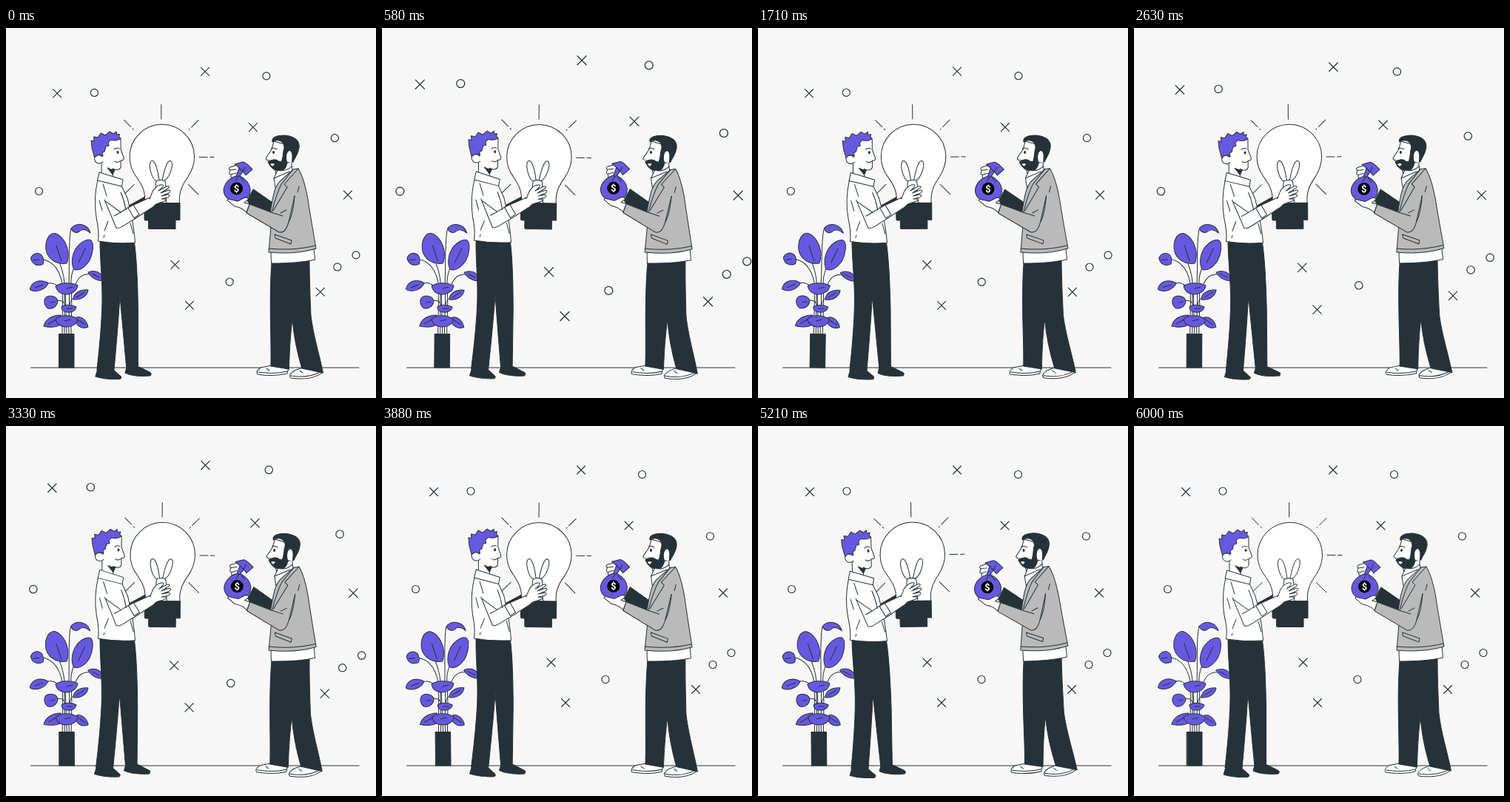
Write an HTML page that moves like this. It is 500 by 500 pixels and loops after 6040 ms.

```html
<!DOCTYPE html>
<html lang="en">
<head>
<meta charset="utf-8">
<title>Idea and funding</title>
<style>
  html, body { margin: 0; width: 100%; height: 100%; overflow: hidden; background: #f7f7f7; }
  svg { display: block; width: 100vw; height: 100vh; }
  svg * { stroke-linecap: round; stroke-linejoin: round; }
  g { fill: none; stroke: #263238; stroke-width: 1; }
  #marks { stroke-width: 1.15; }
  .w { fill: #fff; }
  .d { fill: #263238; }
  .p { fill: #6858e0; }
  .j { fill: #bababa; }
  text { font: 700 13px Roboto, Arial, sans-serif; fill: #fff; stroke: none; text-anchor: middle; }
</style>
</head>
<body>
<svg viewBox="0 0 500 500">
  <g id="marks"></g>
  <g><path d="M33.5 459H477"/></g>

  <g id="plant">
    <path d="M76 413C76 390 77 370 76 352M79 413V358M82 413L80 355M85 413C84 390 87 370 85 352M88 413C88 390 90 375 88 350
      M85 345C86 320 84 285 88 271M79 345C78 330 74 322 66 300M88 345C87 335 92 318 104 302M76 345C72 325 62 312 42 312
      M93 349C97 336 104 331 119 333M70 349C65 344 59 343 50 347M80 376C79 369 74 366 62 370M86 376C86 368 90 364 98 361"/>
    <path class="p" d="M88 271C92 265 100 264 106 267C111 269 113 273 114 277C108 272 103 271 99 275C95 278 90 276 88 271Z"/>
    <path class="p" d="M82 318C70 320 57 314 54 300C52.500 287 58 277 66 277.500C76 280 83 293 84 304C84 311 84 315 82 318Z"/>
    <path class="p" d="M92 326C87.500 319 89 306 95 297C101 289 110 284 115 287C119 291 118 304 113 314C107 323 99 329 92 326Z"/>
    <path class="p" d="M50 319C42 323 35 319 33.500 311C37 303 45 303 49 308C51 312 51 316 50 319Z"/>
    <path class="p" d="M111 330C120 326 130 330 133 341C125 343 115 338 111 330Z"/>
    <path class="p" d="M57 345C50 340 40 341 35 347C33 350 32 353 33 354C41 358 53 354 57 345Z"/>
    <path class="p" d="M91 367C91 358 100 353 111 354C110 362 102 368 91 367Z"/>
    <path class="p" d="M70 369C69 363 60 360 54 364C50 369 52 376 57 379C64 380 69 376 70 369Z"/>
    <path class="p" d="M51 403C53 394 62 388 74 388L75 400C70 405 58 405 51 403Z"/>
    <path class="p" d="M95 391C102 389 109 395 111 404C104 407 98 404 95 399Z"/>
    <path class="p" d="M67 349C74 343 90 344 97 348C96 356 88 360 80 360C72 359 68 354 67 349Z"/>
    <path class="p" d="M75 377C80 373 90 374 95 377C94 382 88 385 83 384C78 384 75 381 75 377Z"/>
    <path class="p" d="M67 394C72 387 90 387 97 394C95 401 88 404 82 404C74 404 69 400 67 394Z"/>
    <path d="M68 294L75 315M107 298L98 317M37 314L45 313M116 332L126 337M39 351L50 347M82 352L90 350M95 364L106 357
      M60 371L66 370M82 379H90M57 400L68 394M79 396L87 394M98 395L107 401"/>
    <path class="d" d="M71.500 413.500H92V459H71.500Z"/>
  </g>

  <g id="seller">
    <path d="M209.700 103.500V123M159.500 124.500L168.500 133.500M171 136L172.500 137.500M260 124.500L250.500 134M248 136.500L247 137.500
      M261 174.500H272M275.500 174.500H281M246.500 211.500L260 225M173 211.500L160 224.500"/>
    <path class="d" d="M161 243L188 228V236L168 249Z"/>
    <path class="w" d="M187.500 237C189 220 183 211 176 201C170 193 167 184 167 174A43.750 43.750 0 0 1 254.500 174C254.500 184 251 193 246 201C239 211 233 221 234.500 237Z"/>
    <path d="M202 236C203 225 201 216 203 207Q209 204 215 207C217 216 215 225 217 236
      M203 207C196 203 192 184 196 180C201 177 205 191 207 206M214 206C221 203 227 184 223 180C218 177 214 191 211 206"/>
    <path class="d" d="M187 236.500H235V259.500H229V271.500H194Q192.500 271.500 192.500 270V260H188.500Q187 260 187 258Z"/>

    <path class="d" d="M163 459L161 466C169 470 182 471 195 470Q198 467 194 465L180 458Z"/>
    <path class="d" d="M124 461L121 471C130 474 142 475 154 474.500Q158 472 153 469L144 461Z"/>
    <path class="d" d="M127 288L173.500 290C177 315 178 350 178.500 380V459L163 460C160 430 157 395 154 362C152 395 149 430 146 463L123 462C126 435 129.500 400 130 370C130.500 340 127 315 127 288Z"/>

    <path class="w" d="M129 176V199L144 202V190C149 193 154 192 155 188L155 179C158 179 160 178 159 175L155 164V150L131 150Z"/>
    <path class="d" d="M137 189Q142 192 147 191.500L144 198Z"/>
    <path class="w" d="M130 174C124 169 118 173 120 179C122 184 128 184 131 181"/>
    <path class="p" d="M119.500 175L116 162L115 152L119 153L118.500 147L124 148L128 142L134 145L140 140L145 143L149 140L149.500 144L153.500 143.500L152.500 147L155 149C151 153 146 152 141 151.500L138 155L139 159L135 160L133 167L130 168.500L131 173C126 170 122 172 119.500 175Z"/>
    <path d="M146 164Q149 161 153 163M147 180Q150 183 154 180"/>
    <ellipse class="d" cx="151" cy="168" rx="1" ry="1.500"/>

    <path class="w" d="M124 205C120 222 119.500 240 122 256C125 270 126 278 124.500 288Q149 292 174.500 290C173 268 169 250 164 230L156 213Z"/>
    <path class="w" d="M126 195L158 205L156.500 214L123.500 206Z"/>
    <path class="w" d="M133 232L149 270C154 272 160 266 174 258L203 239L199 227L166 242L155 249L134 234"/>
    <path class="w" d="M165 243L172 239L180 252L173 257Z"/>
    <path d="M155 249L146 254M155 222C160 233 161 240 162 246M126 233L130 247M131 211L136 227M138 261L133 274M168 264L172 278M133 280L132 283"/>
    <path class="w" d="M194 231L198 221C201 215 207 211 212 212Q214 214 206 220L217 214Q222 213 220 216L209 223L220 219Q224 220 220 223L210 227L219 225Q223 226 219 229L210 231L215 231Q218 233 214 234C208 237 204 236 200 240"/>
  </g>

  <g id="buyer">
    <path class="w" d="M344 459C340 462 338 465 340 468C353 470 368 470 380 467L382 459L359 456Z"/>
    <path class="w" d="M390 463C385 466 382 470 385 473C399 475 416 474 427 466L424 458L403 458Z"/>
    <path d="M341 465C354 467 368 467 380 464M385 470C398 472 414 471 426 464M352 460L356 463M397 463L401 466"/>
    <path class="d" d="M359 317L410 314C410 340 411 362 412 388C415 415 423 438 428.500 466L400 460C394 440 389 419 387 393C384 417 383 440 382.500 461L358 457C359 420 355 370 359 317Z"/>
    <path class="w" d="M358 302L358.500 318C378 318 400 317 417.500 313L416 298Z"/>

    <path class="d" d="M334 218L360 236V249L329 238L326 233Z"/>
    <path class="w" d="M362 153L359 164L351 176Q351 179 356 179L363 190L366 202L386 194V160Z"/>
    <path class="d" d="M360 154C358 148 366 145 376 145C388 146 397 151 396 161C395 171 390 175 388 181L380 182C379 187 377 191 373 193C365 194 358 190 354 181C359 177 365 177 368 180L372 181C375 175 374 166 376 162C376 156 373 153 369 152Q364 151 360 154Z"/>
    <path class="w" d="M380 181C378 175 379 167 383 166C388 167 386 177 386 182Z" stroke="none"/>
    <path class="w" d="M357 184Q360 182 363 184L360 187Z" stroke="none"/>
    <path d="M358 163Q362 161 366 164"/>
    <ellipse class="d" cx="361.500" cy="168" rx="1" ry="1.500"/>
    <path class="w" d="M367 192L362 203L364 216L388 197L386 187Q378 195 367 192Z"/>
    <path d="M362 203L383 194"/>

    <path class="j" d="M388 191L395 190C401 200 405 215 408 232C411 252 415 275 419 298C400 304 375 305 355 303L358 268L357 249C360 232 362 215 370 207Z"/>
    <path class="j" d="M390 227L382 262C379 272 376 277 369 276L325 250L329 238L358 249L374 254"/>
    <path d="M388 191L372 211C365 225 362 238 359 249M395 190L376 211L380 215L361 247M371 250L379 246M382 262C385 257 388 249 390 227M355 298C375 300 398 299 418 294M363 279L386 287L385 292L364 284ZM394 222L396 214"/>

    <path class="w" d="M313 185L303 188Q300 190 303 192L302 195Q301 198 304 198L304 202L315 203L318 188Z"/>
    <path d="M303 192L311 191M304 198L311 196"/>
    <path class="p" d="M311 200C301 203 294 211 294 220C295 230 303 234 312 234C322 234 330 229 330 219C330 211 324 204 316 200L320 194L324 199L333 191C328 186 324 181 320 181L309 184L315 189Z"/>
    <path d="M311 200Q314 202 316 200M315 189L320 194M320 194L323 188M313 202L310 207M317 202L322 208"/>
    <circle cx="311.500" cy="217" r="8.500" fill="#000" stroke="none"/>
    <text x="311.500" y="221.600">$</text>
    <path class="w" d="M329 238L325 249C320 244 315 242 309 241L299 233Q299 230 304 232L313 234L323 229Q328 229 327 232L322 236Z"/>
  </g>
</svg>
<script>
  const $ = id => document.getElementById(id);
  const crosses = [[70, 89], [269, 59.5], [333.5, 134.5], [461, 225.5], [228.5, 319.5], [248, 374], [424, 356]];
  const rings = [[120, 88], [351.5, 65.5], [443.5, 149], [45.5, 220.5], [302, 342.5], [447, 322.5], [472, 306.5]];
  $('marks').innerHTML =
    crosses.map(([x, y]) => `<path d="M${x - 5.5} ${y - 5.5}l11 11m0-11l-11 11"/>`).join('') +
    rings.map(([x, y]) => `<circle cx="${x}" cy="${y}" r="5"/>`).join('');

  // Linear rise to 1 at the peak, then fall to 0
  const beat = (t, start, peak, end) =>
    Math.max(0, Math.min((t - start) / (peak - start), (end - t) / (end - peak)));

  // Triangle wave: 0, 1 at a quarter, -1 at three quarters
  const wind = (t, period) => {
    const u = (t / period + 0.25) % 1;
    return 1 - 4 * Math.abs(u - 0.5);
  };

  const turn = (id, deg, x, y) => $(id).setAttribute('transform', `rotate(${deg} ${x} ${y})`);

  function draw() {
    const t = Math.min(performance.now() % 6040 + 25, 6000);
    const s = 1 + 0.1 * (beat(t, 0, 600, 1800) + beat(t, 2400, 3000, 3600));
    $('marks').setAttribute('transform', `translate(258.5 218) scale(${s}) translate(-258.5 -218)`);
    turn('plant', wind(t, 6000), 82, 362);
    turn('seller', wind(t, 3000), 201, 289);
    turn('buyer', wind(t, 3000), 361, 310);
    requestAnimationFrame(draw);
  }
  draw();
</script>
</body>
</html>
```
